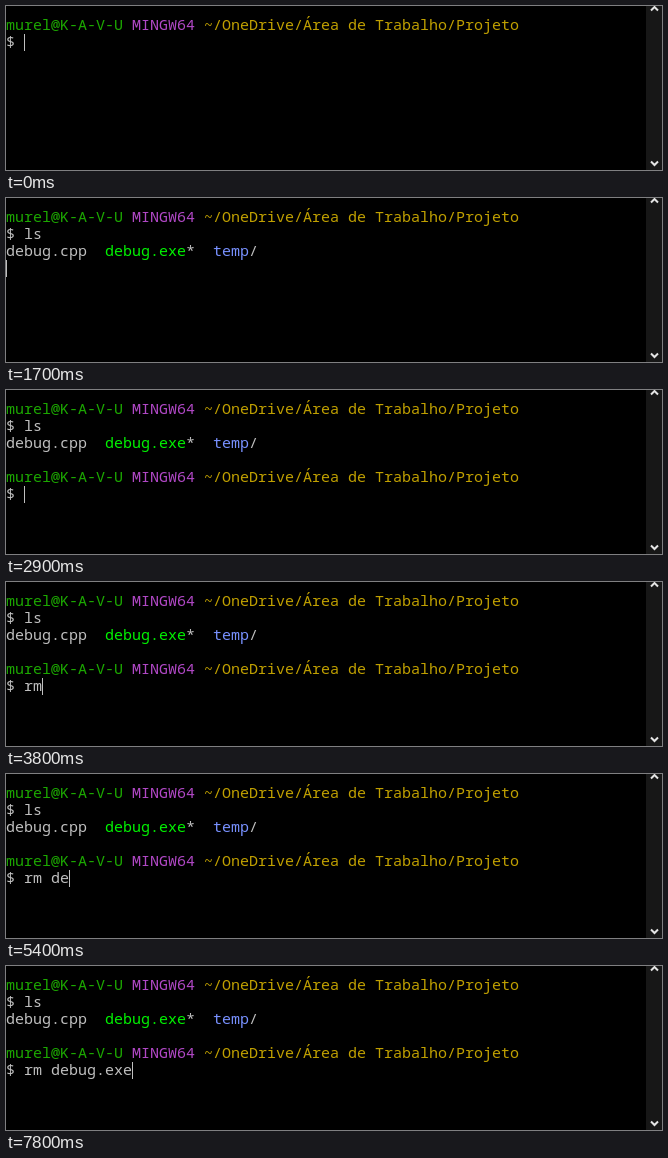
These frames come from a looping animation (656x164 px, 8 s). An HTML page:

```html
<!DOCTYPE html>
<html lang="pt">
<head>
<meta charset="utf-8">
<title>Terminal</title>
<style>
html, body { margin: 0; width: 100%; height: 100%; overflow: hidden; background: #000; }
svg { display: block; }
text { font: 15px "Noto Sans Mono", "DejaVu Sans Mono", monospace; white-space: pre; }
</style>
</head>
<body>
<svg id="stage" width="656" height="164" viewBox="0 0 656 164">
  <rect width="656" height="164" fill="#000"/>
  <g id="lines"></g>
  <rect id="cursor" width="1" height="17" fill="#bfbfbf" shape-rendering="crispEdges"/>
  <rect x="640" width="16" height="164" fill="#171717"/>
  <path d="M645 4.5L648.5 1L652 4.5M645 155.5L648.5 159L652 155.5" fill="none" stroke="#e4e4e4" stroke-width="2"/>
</svg>
<script>
const LOOP = 8000, CELL = 9, ROW = 17, TOP = 11;
const GREY = "#bfbfbf";
const lines = document.getElementById("lines");
const cursor = document.getElementById("cursor");

function print(row, col, str, color = GREY) {
  const el = document.createElementNS("http://www.w3.org/2000/svg", "text");
  el.setAttribute("x", col * CELL);
  el.setAttribute("y", TOP + row * ROW + 13);
  el.setAttribute("fill", color);
  el.textContent = str;
  lines.appendChild(el);
  return el;
}

function prompt(row) {
  return [
    print(row, 0, "murel@K-A-V-U", "#1ca800"),
    print(row, 14, "MINGW64", "#b148c6"),
    print(row, 22, "~/OneDrive/Área de Trabalho/Projeto", "#c0a000")
  ];
}

prompt(0);
const first = print(1, 0, "$ ");
const listing = [
  print(2, 0, "debug.cpp"),
  print(2, 11, "debug.exe", "#00f200"),
  print(2, 20, "*"),
  print(2, 23, "temp", "#7891ff"),
  print(2, 27, "/")
];
const second = print(5, 0, "$ ");
const nextPrompt = [...prompt(4), second];

// Time of each keystroke
const commands = [
  { el: first, str: "ls", keys: [700, 900] },
  { el: second, str: "rm debug.exe",
    keys: [3700, 3800, 4500, 5200, 5400, 5600, 5800, 5900, 6700, 7000, 7600, 7800] }
];
const LIST_AT = 1700, PROMPT_AT = 1900;

// Spans in which the blinking cursor is hidden
const hidden = [[200, 600], [2400, 2900], [3400, 3700], [4300, 4500],
  [5000, 5200], [6500, 6700], [7400, 7500]];

function cursorCell(t, typed) {
  if (t < 1400) return [1, 2 + typed[0]];
  if (t < LIST_AT) return [2, 0];
  if (t < PROMPT_AT) return [3, 0];
  return [5, 2 + typed[1]];
}

function show(els, on) {
  for (const el of els) el.setAttribute("visibility", on ? "visible" : "hidden");
}

function draw(t) {
  const typed = commands.map(c => {
    const n = c.keys.filter(k => k <= t).length;
    c.el.textContent = "$ " + c.str.slice(0, n);
    return n;
  });
  show(listing, t >= LIST_AT);
  show(nextPrompt, t >= PROMPT_AT);
  const [row, col] = cursorCell(t, typed);
  cursor.setAttribute("x", col * CELL);
  cursor.setAttribute("y", TOP + row * ROW);
  show([cursor], !hidden.some(([from, to]) => t >= from && t < to));
}

const start = performance.now();
function tick() {
  draw((performance.now() - start) % LOOP);
  requestAnimationFrame(tick);
}
tick();
</script>
</body>
</html>
```
